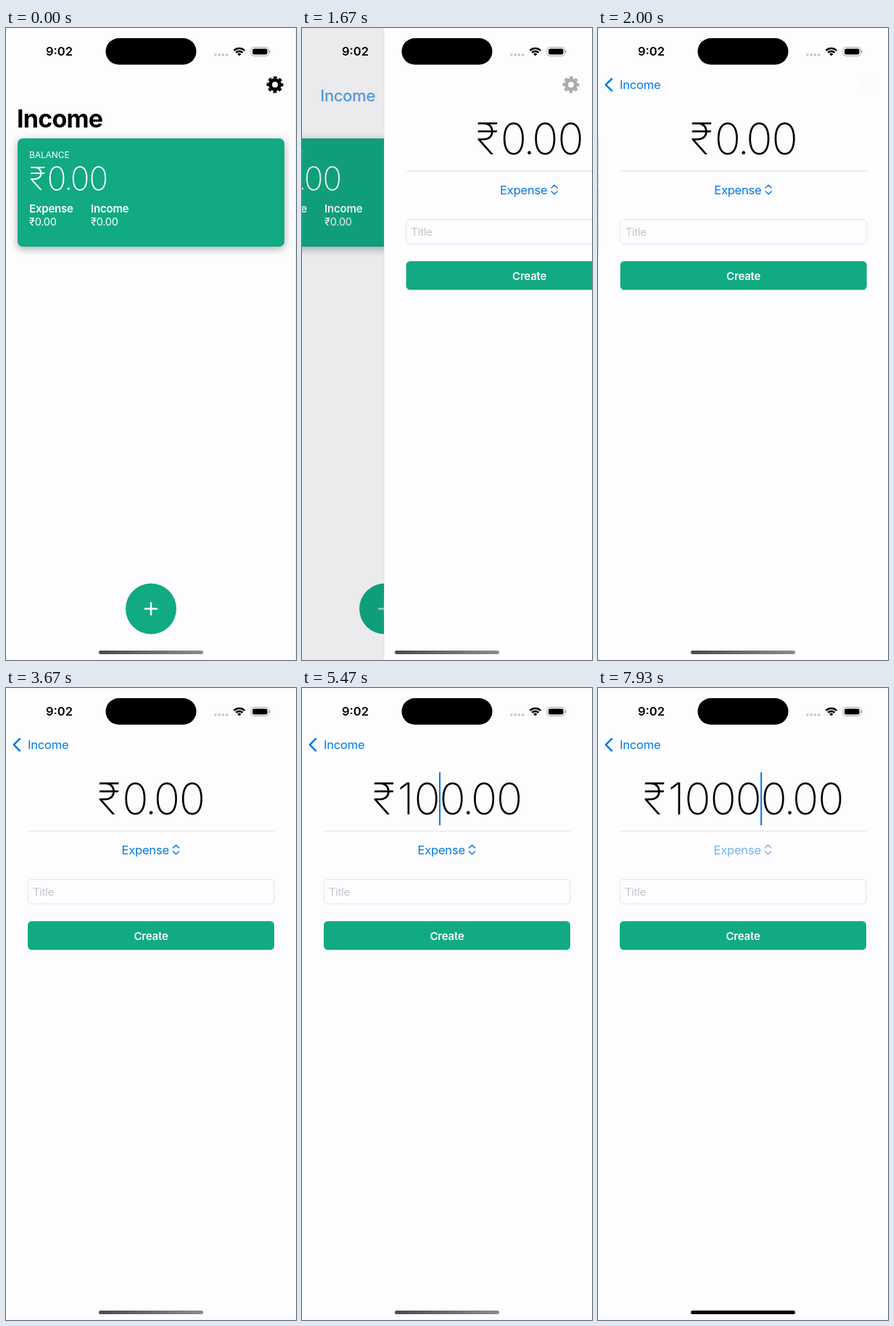
An HTML page for the animation above (8 s loop, 400 by 870 pixels).

```html
<!DOCTYPE html>
<html lang="en">
<head>
<meta charset="utf-8">
<title>Income</title>
<style>
  html, body { margin: 0; width: 100%; height: 100%; overflow: hidden; background: #fdfcff; }
  svg { display: block; width: 100%; height: 100%; }
  text { font-family: Inter, "Open Sans", sans-serif; }
  .amount { font-weight: 200; text-anchor: middle; }
  .link { font-size: 16.5px; letter-spacing: -.2px; fill: #007ae8; }
  .semi { font-weight: 600; font-size: 15px; letter-spacing: -.2px; }
  .line { fill: none; stroke: #007ae8; stroke-linecap: round; stroke-linejoin: round; }
  .card { filter: drop-shadow(0 3px 6px rgba(0, 0, 0, .33)); }
</style>
</head>
<body>
<svg viewBox="0 0 400 870">
  <defs>
    <linearGradient id="bar">
      <stop stop-color="#4a4a4a"/><stop offset="1" stop-color="#8c8c8c"/>
    </linearGradient>
  </defs>
  <rect width="400" height="870" fill="#fdfcff"/>

  <g id="home">
    <rect class="card" x="16" y="152" width="368" height="149" rx="7" fill="#11aa83"/>
    <g fill="#fff">
      <text x="32" y="179" font-size="12" letter-spacing="-.1">BALANCE</text>
      <text id="balance" class="amount" y="223"></text>
      <text class="semi" x="32" y="254">Expense</text>
      <text class="semi" x="117" y="254">Income</text>
      <g font-size="14.5" letter-spacing="-.2">
        <text x="32" y="272">₹0.00</text>
        <text x="117" y="272">₹0.00</text>
      </g>
    </g>
    <circle cx="200" cy="799.5" r="35" fill="#11aa83"/>
    <path id="plus" d="M192 799.5h16M200 791.5v16" stroke="#fff" stroke-width="2.5" stroke-linecap="round"/>
  </g>
  <rect id="dim" width="400" height="870"/>

  <g id="sheet">
    <rect x="-.5" width="401" height="870" fill="#fdfcff" stroke="#000" stroke-opacity=".06"/>
    <text id="sum" class="amount" y="174"></text>
    <rect id="caret" y="116" width="2" height="73" fill="#007ae8"/>
    <path d="M30 197h340" stroke="#e2e1e4"/>
    <g id="picker">
      <text class="link" x="159.5" y="228.5">Expense</text>
      <path class="line" stroke-width="1.5" d="M230.5 220l4-3.7 4 3.7M230.5 225l4 3.7 4-3.7"/>
    </g>
    <rect x="30" y="263.5" width="340" height="33.5" rx="5" fill="none" stroke="#e5e4e7"/>
    <text x="37" y="286" font-size="14.5" letter-spacing="-.1" fill="#c4c3c7">Title</text>
    <rect x="30" y="321" width="340" height="39.5" rx="5.5" fill="#11aa83"/>
    <text class="semi" x="200" y="346.5" text-anchor="middle" fill="#fff">Create</text>
  </g>

  <g id="gear" fill="none" stroke="#000">
    <circle cx="371" cy="78" r="6.5" stroke-width="5"/>
    <circle cx="371" cy="78" r="10" stroke-width="3" stroke-dasharray="4.6 3.254" stroke-dashoffset="2.3"/>
  </g>
  <path id="back" class="line" stroke-width="2.5" d="M19 70l-8.3 8.2 8.3 8.2"/>
  <text id="big" font-size="34" font-weight="700" letter-spacing="-.75">Income</text>
  <text id="small" class="link">Income</text>

  <text x="55" y="38.4" font-size="16.5" font-weight="600">9:02</text>
  <rect x="137.5" y="14" width="125" height="36.5" rx="18.2"/>
  <path d="M289 37h16" stroke="#c1c1c4" stroke-width="3.5" stroke-linecap="round" stroke-dasharray="0 5.2"/>
  <g fill="none" stroke="#000" stroke-width="2.6">
    <path d="M314.4 31.1a10.5 10.5 0 0 1 14.8 0M317.2 33.9a6.5 6.5 0 0 1 9.2 0"/>
    <path d="M321.8 38.5l-2.6-2.6a3.7 3.7 0 0 1 5.2 0z" fill="#000" stroke="none"/>
  </g>
  <rect x="338" y="26.5" width="24.5" height="12" rx="3.8" fill="none" stroke="#a8a8aa"/>
  <rect x="340" y="28.5" width="20.5" height="8" rx="2.3"/>
  <path d="M364 30.7v3.6" stroke="#a8a8aa" stroke-width="1.4"/>
  <rect id="grip" x="128" y="857" width="144" height="5" rx="2.5"/>
</svg>

<script>
const LOOP = 8000, PRESS = 1400, PUSH = 1535, TAP = 7930;
// Each edit: time, text, number of glyphs before the caret.
const edits = [
  [2800, "₹0.00", 1],
  [4930, "₹10.00", 2],
  [5470, "₹100.00", 3],
  [5730, "₹1000.00", 4],
  [6470, "₹10000.00", 5]
];
const advance = { "₹": 37, "1": 23.5, "0": 35.1, ".": 8.4 };
const $ = id => document.getElementById(id);
const clamp = v => Math.max(0, Math.min(1, v));
const mix = (a, b, k) => a + (b - a) * k;
const set = (id, attrs) => {
  for (const name in attrs) $(id).setAttribute(name, attrs[name]);
};

// Sets a centred sum and returns the edges between its glyphs.
function setAmount(id, text, size, center) {
  const scale = size / 60;
  const edges = [0], mids = [];
  for (const ch of text) {
    const left = edges.at(-1), right = left + advance[ch] * scale;
    mids.push((left + right) / 2);
    edges.push(right);
  }
  const start = center - .9 * scale - edges.at(-1) / 2;
  $(id).textContent = text;
  set(id, { "font-size": size, x: mids.map(x => x + start).join(" ") });
  return edges.map(x => x + start);
}

// Solid after an edit, then a soft blink.
function caretAlpha(age) {
  if (age < 0) return 0;
  if (age < 510) return 1;
  const v = (age - 510) % 1140;
  return v < 400 ? clamp(1 - v / 145) : clamp((v - 370) / 110);
}

function draw(t) {
  const w = Math.max(0, t - PUSH) * .0185;
  const p = 1 - (1 + w) * Math.exp(-w);
  const q = p ** 1.15;

  set("home", { transform: `translate(${-120 * p})` });
  set("plus", { opacity: t < PRESS ? 1 : .6 });
  set("dim", { opacity: .1 * p });
  set("sheet", { transform: `translate(${400 * (1 - p)})` });
  set("gear", { opacity: 1 - q });
  set("back", { opacity: clamp((p - .75) * 4) });

  const place = `translate(${mix(15, 30, q)} ${mix(136.5, 84, q)})`;
  const width = mix(116, 56, q);
  set("big", { transform: `${place} scale(${width / 116})`, opacity: (1 - q) ** 2 });
  set("small", { transform: `${place} scale(${width / 56})`, opacity: q });

  const [time, text, index] = edits.findLast(e => e[0] <= t) || edits[0];
  const edges = setAmount("sum", text, 60, 200);
  set("caret", { x: edges[index] - 1, opacity: caretAlpha(t - time) });

  const tapped = t >= TAP;
  set("picker", { opacity: tapped ? .55 : 1 });
  set("grip", { fill: tapped ? "#000" : "url(#bar)" });
}

function frame() {
  draw(performance.now() % LOOP);
  requestAnimationFrame(frame);
}

setAmount("balance", "₹0.00", 44, 86);
frame();
</script>
</body>
</html>
```
